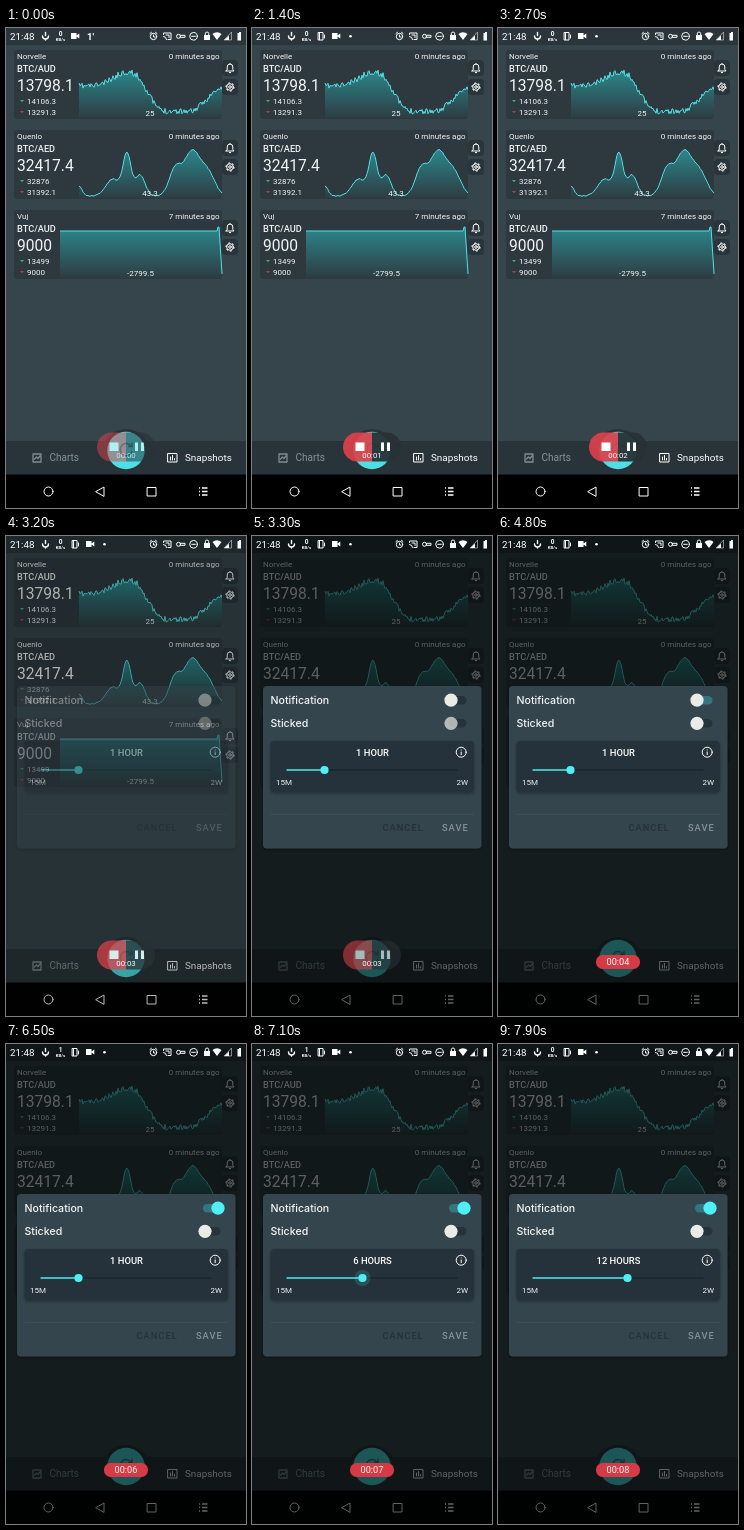
An HTML page that plays this animation: 240 by 480 pixels, repeating every 8 s.

```html
<!DOCTYPE html>
<html lang="en">
<head>
<meta charset="utf-8">
<title>Price snapshots</title>
<style>
  html, body { margin: 0; width: 100%; height: 100%; overflow: hidden; background: #000; }
  svg { display: block; width: 100vw; height: 100vh; font-family: Roboto, sans-serif; }
  .line { fill: none; stroke: #fff; stroke-linecap: round; stroke-linejoin: round; }
  .label { font: 500 10.6px Inter, sans-serif; fill: #f4f6f6; }
  .button { font-size: 9.3px; font-weight: 500; letter-spacing: 1px; }
  .mid { text-anchor: middle; }
  .end { text-anchor: end; }
</style>
</head>
<body>
<svg viewBox="0 0 240 480">
  <defs>
    <linearGradient id="fill" x1="0" y1="0" x2="0" y2="1">
      <stop offset="0" stop-color="#2b9599" stop-opacity=".85"/>
      <stop offset="1" stop-color="#2b9599" stop-opacity=".04"/>
    </linearGradient>
    <filter id="shadow" x="-10%" y="-20%" width="120%" height="150%">
      <feDropShadow dx="0" dy="1" stdDeviation="1.5" flood-opacity=".35"/>
    </filter>
    <path id="bell" class="line" d="M-4 3H4L2.8 1.5V-1A2.8 3 0 0 0-2.8-1V1.5ZM-.7 4.6H.7M0-4V-4.4"/>
    <g id="gear" class="line">
      <circle r="3.3"/><circle r="1.3"/>
      <circle r="4.1" stroke-width=".9" stroke-dasharray="2.1" stroke-linecap="butt"/>
    </g>
    <path id="camera" d="M-4-3H1.5V-.6L4.3-2.6V2.6L1.5 .6V3H-4Z" fill="#fff"/>
  </defs>

  <rect width="240" height="480" fill="#36444b"/>
  <rect width="240" height="17" opacity=".2"/>
  <g id="cards"></g>

  <g id="tabs">
    <rect y="413" width="240" height="34" fill="#29343a"/>
    <circle cx="120" cy="425" r="24" fill="#29343a"/>
    <circle cx="120" cy="422.5" r="18.7" fill="#4ddfe4"/>
    <path d="M125 418A6 6 0 1 0 126 423M126 414.5V418.5H122" fill="none" stroke="#1d4a50" stroke-width="1.5" opacity=".6"/>
    <path d="M27 426H35V434H27ZM28.5 431L30.5 429L32 430.5L34 428" class="line" style="stroke:#7f8c91" stroke-width="1.3"/>
    <path d="M162 425.500H171V434H162ZM164.500 432V429M166.500 432V427.500M168.500 432V430.500" class="line"/>
    <text x="43.5" y="433.3" font-size="10" fill="#84929a">Charts</text>
    <text x="179" y="433.3" font-size="9.9" fill="#fff">Snapshots</text>
  </g>

  <g id="navigation">
    <rect y="446.5" width="240" height="33.5"/>
    <g class="line">
      <circle cx="42.5" cy="463.5" r="4.5"/>
      <path d="M90 463.500L98 459V468ZM141.500 459.500H150V468H141.500Z"/>
      <path d="M193 460H201.500M193 463.500H201.500M193 467H201.500" stroke-dasharray="1 2 6" stroke-linecap="butt" stroke-width="1.3"/>
    </g>
  </g>

  <rect id="scrim" width="240" height="480" fill="#000402"/>

  <g id="dialog">
    <rect x="11" y="150" width="218.5" height="162.500" rx="4" fill="#36454d" filter="url(#shadow)"/>
    <text class="label" x="18.500" y="168.300">Notification</text>
    <text class="label" x="18.500" y="191.300">Sticked</text>
    <rect id="track" x="197" y="160" width="17.500" height="8.500" rx="4.200"/>
    <circle id="halo" cy="164.200" r="12" fill="#4ff0f5"/>
    <circle id="knob" cy="164.200" r="6.600"/>
    <rect x="197" y="183" width="17.500" height="8.500" rx="4.200" fill="#26333a"/>
    <circle id="sticky" cx="199" cy="187.300" r="6.600" fill="#e9ece7"/>
    <rect x="18.500" y="205" width="203.500" height="51.500" rx="4" fill="#27323a" filter="url(#shadow)"/>
    <text id="period" class="mid" x="120.500" y="219.800" font-size="9.400" font-weight="500" fill="#fff"></text>
    <g class="line" transform="translate(209.2 216.2)">
      <circle r="5"/><path d="M0-.2V2.400M0-2.300V-2.200"/>
    </g>
    <path d="M34.500 234H205.500" stroke="#17252b" stroke-width="1.300"/>
    <path id="active" stroke="#4ff0f5" stroke-width="1.600"/>
    <circle id="press" cy="234" r="8" fill="#4ff0f5"/>
    <circle id="thumb" cy="234" r="4.100" fill="#4ff0f5"/>
    <g font-size="8" fill="#eef2f2">
      <text x="24" y="248.500">15M</text>
      <text class="end" x="216" y="248.500">2W</text>
    </g>
    <path d="M18.500 278.500H222" stroke="#405059" stroke-width=".8"/>
    <text class="button" x="130.500" y="295" fill="#25323a">CANCEL</text>
    <text class="button" x="190" y="295" fill="#84929a">SAVE</text>
  </g>

  <g id="recorder">
    <g id="controls">
      <path d="M120 404.500H105.500A14.500 14.500 0 0 0 105.500 433.500H120Z" fill="#dc414a" fill-opacity=".93"/>
      <path d="M120 404.500H134.500A14.500 14.500 0 0 1 134.500 433.500H120Z" fill="#283136" fill-opacity=".95"/>
      <path d="M103.500 414.500H112.500V423H103.500ZM129 414.500H132V423H129ZM135 414.500H138V423H135Z" fill="#fff"/>
    </g>
    <rect id="pill" x="98" y="419" width="44" height="14" rx="6.500" fill="#d63a44"/>
    <text id="timer" class="mid" x="120" fill="#fff"></text>
  </g>

  <g id="status" fill="#fff">
    <text x="4" y="11.500" font-size="9.800">21:48</text>
    <path d="M39.500 4.500V7.500M36.500 8A3 3 0 0 0 42.500 8M39.500 11V12" class="line" stroke-width="1.400"/>
    <text id="rate" class="mid" x="54.500" y="8" font-size="6.500" font-weight="700"></text>
    <text class="mid" x="54.500" y="12.800" font-size="4.300" font-weight="700">KB/s</text>
    <g id="early">
      <use href="#camera" x="69" y="8"/>
      <text x="81" y="11.500" font-size="9.500" font-weight="700">1'</text>
    </g>
    <g id="late">
      <path d="M66.500 4.500H71V12H66.500ZM67.500 5V11.500M72.500 7V10" class="line"/>
      <use href="#camera" x="84" y="8"/>
      <circle cx="98.500" cy="8.300" r="1.300"/>
    </g>
    <g class="line">
      <circle cx="147.500" cy="8.500" r="3.200"/>
      <path d="M147.500 7V9H149M144 5.500L145.500 4.300M151 5.500L149.500 4.300"/>
      <path d="M157.500 6.500V5H165V11.500H162M157.500 8.500A3 3 0 0 1 160.500 11.500M160 7H163V9.500"/>
      <circle cx="172.500" cy="8.300" r="2"/><path d="M174.500 7.300H179V9.300H174.500"/>
      <circle cx="187.500" cy="8.300" r="3.800"/><path d="M185.700 8.300H189.300"/>
      <path d="M199.300 7V5.700A1.700 1.700 0 0 1 202.700 5.700V7"/>
      <path d="M218.500 12H225.500V4.500Z" stroke-width=".7" opacity=".7"/>
    </g>
    <path d="M198 7H204V12H198ZM206.500 6A7 7 0 0 1 215.500 6L211 12ZM218.500 12H223V7.500Z"/>
    <path d="M236.500 5H238V4H240V12.500H236.500Z" transform="translate(-5 0)"/>
  </g>
</svg>
<script>
const LOOP = 8000;
const $ = id => document.getElementById(id);
const set = (id, attrs) => {
  for (const key in attrs) $(id).setAttribute(key, attrs[key]);
};
const clamp = x => Math.min(1, Math.max(0, x));
const ramp = (t, from, to) => clamp((t - from) / (to - from));
const ease = x => x * x * (3 - 2 * x);

let seed = 11;
const random = () => (seed = seed * 16807 % 2147483647) / 2147483647 - .5;
const bump = (x, center, height, width) => height * Math.exp(-(((x - center) / width) ** 2) / 2);
const sample = (from, to, f) => Array.from({ length: to - from + 1 }, (_, i) => [from + i, f(from + i)]);

// A rise to a peak, a slide into a trough, then a recovery, all with jitter.
const jagged = x => 58 - bump(x, 121, 14, 13) + 25 * ease(ramp(x, 130, 157))
  - 22 * ease(ramp(x, 184, 216)) + random() * 6;
const smooth = x => 168 - bump(x, 73, 10, 3) - bump(x, 107, 17, 7) - bump(x, 121, 41, 4)
  - bump(x, 134, 21, 5) - bump(x, 169, 26, 6) - bump(x, 186, 44, 8) - bump(x, 202, 22, 7) + random();
const cliff = [[54, 203], [211, 203], [212, 199], [213, 199], [216, 246]];

const cards = [
  { name: 'Norvelle', pair: 'BTC/AUD', age: 0, price: '13798.1', high: '14106.3', low: '13291.3',
    delta: '25', points: sample(73, 216, jagged) },
  { name: 'Quenlo', pair: 'BTC/AED', age: 0, price: '32417.4', high: '32876', low: '31392.1',
    delta: '43.3', points: sample(73, 216, smooth) },
  { name: 'Vuj', pair: 'BTC/AUD', age: 7, price: '9000', high: '13499', low: '9000',
    delta: '-2799.5', points: cliff }
];

function cardMarkup(card, i) {
  const left = card.points[0][0];
  const path = 'M' + card.points.map(p => p.join(' ')).join('L');
  const text = (x, y, value, attrs = '') => `<text x="${x}" y="${y}" ${attrs}>${value}</text>`;
  const button = (icon, y) => `<rect x="216" y="${y - 8}" width="16" height="16" rx="4" fill="#2a353b"/>
    <use href="#${icon}" x="224" y="${y}"/>`;
  const arrow = (y, color) => `<path d="M14 ${y}h4l-2 2.2Z" fill="${color}"/>`;
  const top = 22 + 80 * i;
  return `<rect x="8" y="${top}" width="208" height="69" rx="3" fill="#2d393f"/>
    <path d="${path}V${top + 68}H${left}Z" fill="url(#fill)"/>
    <path d="${path}" fill="none" stroke="#55dfe3" stroke-linejoin="round"/>
    <g transform="translate(0 ${top})" fill="#f2f5f5" font-size="8">
      ${text(11, 9, card.name)}
      ${text(213.5, 9, card.age + ' minutes ago', 'class="end"')}
      ${text(11, 22, card.pair, 'font-size="9.2" font-weight="500"')}
      ${text(11, 41.4, card.price, 'font-size="15.6"')}
      ${text(21, 54, card.high)}${text(21, 65.2, card.low)}
      ${text(left / 2 + 107.5, 66, card.delta, 'class="mid"')}
      ${arrow(50, '#36b36b')}${arrow(61, '#a5474c')}
      ${button('bell', 18)}${button('gear', 37)}
    </g>`;
}
$('cards').innerHTML = cards.map(cardMarkup).join('');

const periods = ['1 HOUR', '3 HOURS', '6 HOURS', '12 HOURS'];

function draw(t) {
  const open = ramp(t, 3120, 3300);
  set('scrim', { opacity: open * .62 });
  set('dialog', { opacity: open });
  set('sticky', { opacity: .7 + .3 * ramp(t, 3300, 3500) });

  const slide = ease(ramp(t, 4800, 5000));
  const knobX = 199 + 13 * slide;
  set('track', { fill: t >= 4750 ? '#35757d' : '#26333a' });
  set('knob', { cx: knobX, fill: slide > .5 ? '#4ff0f5' : '#e9ece7' });
  set('halo', { cx: knobX, opacity: .14 * Math.sin(Math.PI * ramp(t, 4800, 5200)) });

  const step = Math.floor(3 * ramp(t, 6600, 7200));
  const thumbX = 34.5 + 19 * (2 + step);
  $('period').textContent = periods[step];
  set('active', { d: `M34.5 234H${thumbX}` });
  set('thumb', { cx: thumbX });
  set('press', { cx: thumbX, opacity: .16 * ramp(t, 6650, 6800) * (1 - ramp(t, 7500, 7750)) });

  const pill = ramp(t, 3450, 3650);
  set('recorder', { opacity: .55 + .45 * ramp(t, 0, 400) });
  set('controls', { opacity: 1 - ramp(t, 3100, 3600) });
  set('pill', { opacity: pill });
  set('timer', { y: 430.4 - pill, 'font-size': 7.8 + 1.4 * pill });
  $('timer').textContent = '00:0' + Math.floor((t + 100) / 1000);

  $('rate').textContent = t >= 6500 && t < 7500 ? '1' : '0';
  set('early', { opacity: t < 300 ? 1 : 0 });
  set('late', { opacity: t < 300 ? 0 : 1 });
}

const start = performance.now();
function frame() {
  draw((performance.now() - start) % LOOP);
  requestAnimationFrame(frame);
}
frame();
</script>
</body>
</html>
```
